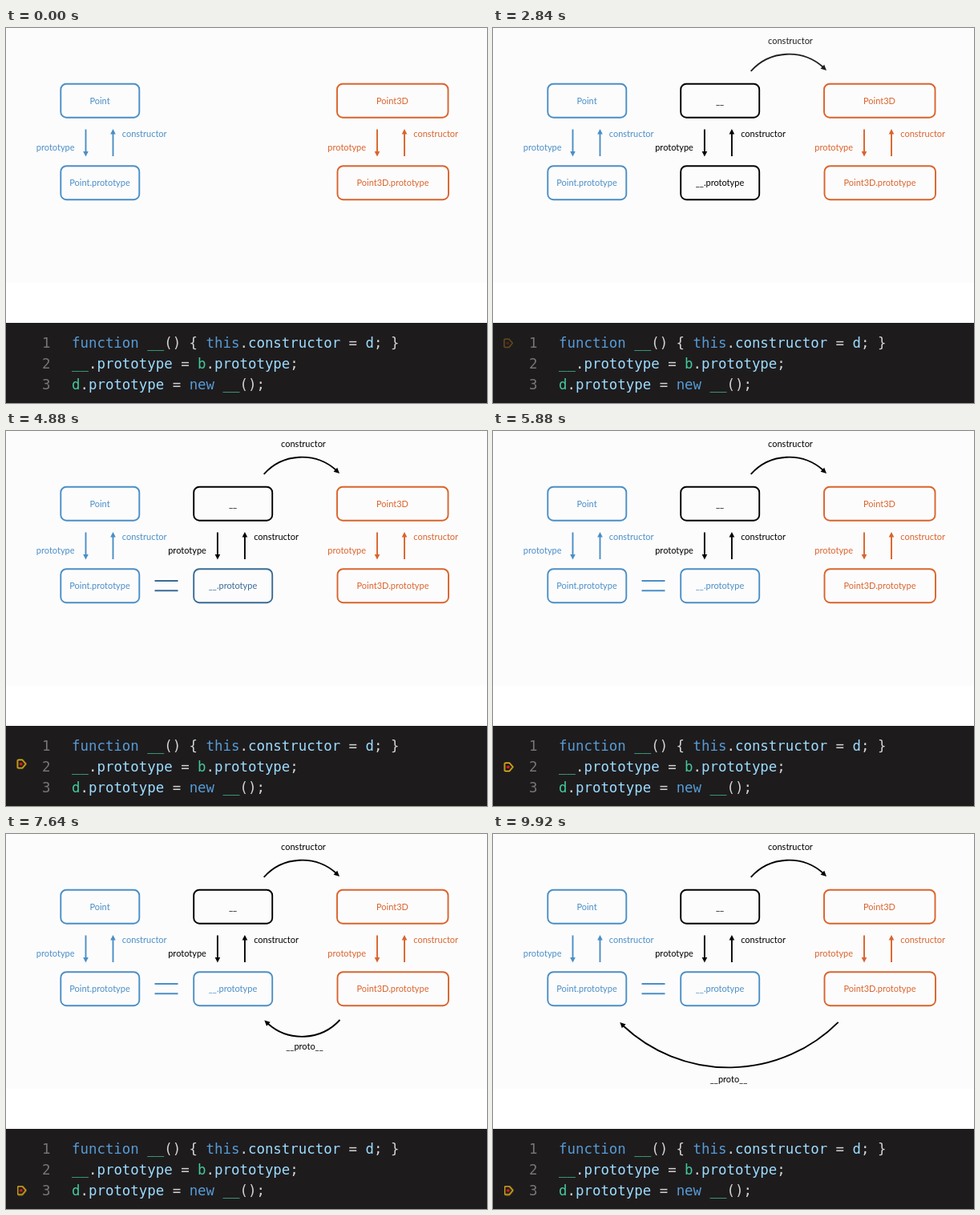
Recreate the animation shown at these times as an HTML page. Size 600 by 468 pixels, loop 9.96 s.

```html
<!DOCTYPE html>
<html lang="en">
<head>
<meta charset="utf-8">
<title>Prototype chain</title>
<style>
html, body { margin: 0; height: 100%; overflow: hidden; background: #fff; }
svg { display: block; width: 600px; height: 468px; }
.label { font: 11px Lato, "Open Sans", sans-serif; fill: currentColor; }
.mid { text-anchor: middle; }
.line { fill: none; stroke: currentColor; stroke-width: 1.9; }
.head { fill: currentColor; }
.blue { color: #4a8fc6; }
.orange { color: #d9642c; }
.black { color: #000; }

.code { font: 17.4px "DejaVu Sans Mono", monospace; fill: #d4d4d4; white-space: pre; }
.num { fill: #767676; }
.key { fill: #569cd6; }
.cls { fill: #43c99b; }
.prop { fill: #9cdcfe; }

.helper, .ctor, .equals, .short, .long, .tint, .pointer, .step {
  animation: 9960ms linear infinite;
}
.helper { animation-name: helper; }
.ctor { animation-name: ctor; }
.equals { animation-name: equals; }
.tint { animation-name: tint; }
.short { animation-name: short; }
.long { animation-name: long; }
.pointer { animation-name: pointer; }
.step { animation-name: step; }

@keyframes helper { 0%, 7.03% { opacity: 0 } 11.04%, 100% { opacity: 1 } }
@keyframes ctor { 0%, 25% { opacity: 0 } 29.02%, 100% { opacity: 1 } }
@keyframes equals { 0%, 40.16% { opacity: 0 } 44.18%, 100% { opacity: 1 } }
@keyframes tint { 0%, 46% { color: #000 } 50%, 100% { color: #4a8fc6 } }
@keyframes short {
  0%, 62.05% { opacity: 0 }
  66.06%, 82.33% { opacity: 1 }
  86.35%, 100% { opacity: 0 }
}
@keyframes long { 0%, 86.35% { opacity: 0 } 90.36%, 100% { opacity: 1 } }
@keyframes pointer { 0%, 27.31% { opacity: 0 } 31.33%, 100% { opacity: 1 } }
@keyframes step {
  0%, 40.16% { transform: translate(0, 0); animation-timing-function: ease-in-out }
  52.21%, 62.55% { transform: translate(.5px, 26px); animation-timing-function: ease-in-out }
  74.6%, 100% { transform: translate(.5px, 51.5px) }
}
</style>
</head>
<body>
<svg viewBox="0 0 600 468">
  <defs>
    <g id="links">
      <path class="line" d="M99.5 126.5V156M133.5 160V130"/>
      <path class="head" d="M96.2 154h6.6l-3.3 6.6zM130.2 132.5h6.6l-3.3-6.6z"/>
      <text class="label" x="37.8" y="153">prototype</text>
      <text class="label" x="144.8" y="136">constructor</text>
    </g>
    <rect id="box" class="line" width="98" height="42" rx="7"/>
    <rect id="wide" class="line" width="138.5" height="42" rx="7"/>
    <path id="tip" class="head" d="M0 0L-7 -3.4V3.4z"/>
  </defs>

  <path fill="#fdfcfd" d="M0 0H600V317.5H0z"/>

  <g class="blue">
    <use href="#box" x="68.3" y="69.7"/>
    <use href="#box" x="68.3" y="172.2"/>
    <use href="#links"/>
    <text class="label mid" x="117" y="94.5">Point</text>
    <text class="label mid" x="117" y="197">Point.prototype</text>
  </g>

  <g class="orange">
    <use href="#wide" x="413" y="69.7"/>
    <use href="#wide" x="413.5" y="172.2"/>
    <use href="#links" x="363.5"/>
    <text class="label mid" x="482" y="94.5">Point3D</text>
    <text class="label mid" x="482.5" y="197">Point3D.prototype</text>
  </g>

  <g class="helper black">
    <use href="#box" x="234.2" y="69.7"/>
    <use href="#links" x="164.4"/>
    <text class="label mid" x="283" y="94.5">__</text>
    <g class="tint">
      <use href="#box" x="234.2" y="172.2"/>
      <text class="label mid" x="283" y="197">__.prototype</text>
    </g>
  </g>

  <g class="ctor black">
    <path class="line" d="M321.7 53.8A64 64 0 0 1 412 49"/>
    <use href="#tip" transform="translate(416 53) rotate(43)"/>
    <text class="label mid" x="371" y="20">constructor</text>
  </g>

  <g class="equals">
    <path class="line tint" d="M185.5 187H214.5M185.5 199.3H214.5"/>
  </g>

  <g class="short black">
    <path class="line" d="M416.5 232A64 64 0 0 1 326.5 236.5"/>
    <use href="#tip" transform="translate(322.3 232.5) rotate(223)"/>
    <text class="label mid" x="372.5" y="269">__proto__</text>
  </g>

  <g class="long black">
    <path class="line" d="M430.7 234.8A193 193 0 0 1 162 239"/>
    <use href="#tip" transform="translate(158.3 235) rotate(225)"/>
    <text class="label mid" x="294" y="309.5">__proto__</text>
  </g>

  <path fill="#1e1b1d" d="M0 368H600V468H0z"/>
  <g class="code">
    <text class="num" x="45" y="399">1</text>
    <text class="num" x="45" y="425">2</text>
    <text class="num" x="45" y="451">3</text>
    <text x="82" y="399"><tspan class="key">function</tspan> <tspan class="cls">__</tspan>() { <tspan class="key">this</tspan>.<tspan class="prop">constructor</tspan> = <tspan class="prop">d</tspan>; }</text>
    <text x="82" y="425"><tspan class="cls">__</tspan>.<tspan class="prop">prototype</tspan> = <tspan class="cls">b</tspan>.<tspan class="prop">prototype</tspan>;</text>
    <text x="82" y="451"><tspan class="cls">d</tspan>.<tspan class="prop">prototype</tspan> = <tspan class="key">new</tspan> <tspan class="cls">__</tspan>();</text>
  </g>

  <g class="pointer">
    <g class="step">
      <path d="M15 388.2H20L24.3 393.3L20 398.4H15Q14 398.4 14 397.4V389.2Q14 388.2 15 388.2z"
        fill="none" stroke="#f5c518" stroke-width="1.5" stroke-linejoin="round"/>
      <circle cx="18.3" cy="393.3" r="1.9" fill="#e0201b"/>
    </g>
  </g>
</svg>
</body>
</html>
```
